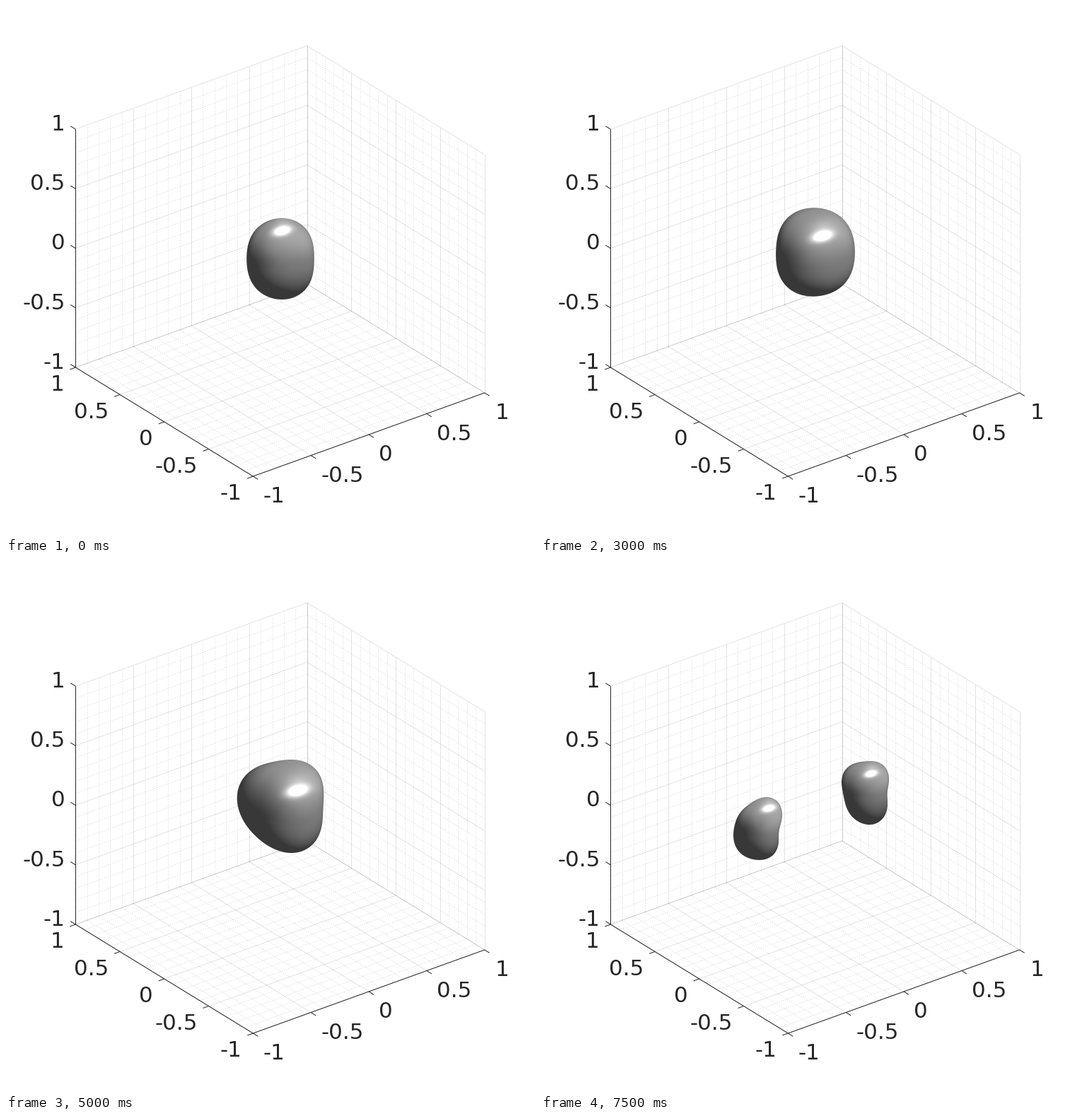
Animation, 748 px wide and 748 px high, one loop 8000 ms. Source, as a matplotlib script:

```python
import numpy as np
import matplotlib.pyplot as plt
from matplotlib.animation import FuncAnimation
from matplotlib.collections import LineCollection

SIZE, DPI, FRAMES, STEP = 748, 100, 16, 500
INK = "#262626"
PX = 72 / DPI  # one pixel in points

fig = plt.figure(figsize=(SIZE / DPI, SIZE / DPI), dpi=DPI, facecolor="white")
ax = fig.add_axes([0, 0, 1, 1])
ax.axis("off")


# ---- axes box -------------------------------------------------------------

def project(x, y, z):
    return np.array([387.5 + 163.7 * x - 125.5 * y,
                     360.6 - 59 * x - 77 * y - 168.4 * z])


def seg(a, b):
    return [project(*a), project(*b)]


def grid(values):
    lines = []
    for v in values:
        lines += [seg((v, -1, -1), (v, 1, -1)), seg((-1, v, -1), (1, v, -1)),
                  seg((v, 1, -1), (v, 1, 1)), seg((-1, 1, v), (1, 1, v)),
                  seg((1, v, -1), (1, v, 1)), seg((1, -1, v), (1, 1, v))]
    return lines


def label(pos, value, dx, dy, ha):
    ax.text(pos[0] + dx, pos[1] + dy, f"{value:g}", ha=ha, va="baseline",
            family="DejaVu Sans", size=31 * PX, color=INK)


def draw_box():
    minor = [v / 10 for v in range(-9, 10) if v % 5]
    major = np.linspace(-1, 1, 5)
    ax.add_collection(LineCollection(grid(minor), colors="#c8c8c8",
                                     linewidths=0.8 * PX,
                                     linestyles=[(0, (1, 2.6))], zorder=1))
    ax.add_collection(LineCollection(grid(major), colors=INK, alpha=0.125,
                                     linewidths=PX, zorder=2))
    edges = [seg((-1, -1, -1), (1, -1, -1)), seg((-1, -1, -1), (-1, 1, -1)),
             seg((-1, 1, -1), (-1, 1, 1))]
    for v in major:
        px, py, pz = project(v, -1, -1), project(-1, v, -1), project(-1, 1, v)
        edges += [[px, px + (7, 4.3)], [py, py + (-8, 2.9)], [pz, pz - (7, 4.3)]]
        label(px, v, 14.5, 37.2, "left")
        label(py, v, -15.8, 33.2, "right")
        label(pz, v, -14.5, 1.7, "right")
    ax.add_collection(LineCollection(edges, colors=INK, linewidths=PX, zorder=3))


# ---- blobs ----------------------------------------------------------------

LIGHT = np.array([.43, .50, .75])
HALF = np.array([.23, .27])  # where a sphere would catch the light
# World axes seen from the camera: right, up, towards the viewer.
WORLD = np.array([[.793, .304, -.527], [-.609, .397, -.687], [0, .866, .5]])

# time step: top, bottom, three-fold waves (cos, sin), lean, glint x, glint y
KEYS = {
    0: (300, 415, -.01, 0, 0, .05, .69),
    2: (275, 409, .005, 0, .005, .14, .56),
    4: (278, 412, -.01, -.01, -.015, .15, .54),
    7: (289, 410, .02, 0, .015, .19, .27),
    10: (278, 410, -.058, .035, -.03, .39, .33),
    12: (268, 422, 0, .04, 0, .19, .56),
}
SPLIT = 15  # step at which the blob has parted in two

X0, Y0, X1, Y1 = 256, 256, 508, 436
gx, gy = np.meshgrid(np.arange(X0, X1) + .5, np.arange(Y0, Y1) + .5)
TURN = np.linspace(0, 2 * np.pi, 361)


def radius(angle, hw, hh, waves, square):
    """Ellipse with a lean, a three-fold wave and slightly squared corners."""
    c3, s3, lean = waves
    ellipse = 1 / np.hypot(np.cos(angle) / hw, np.sin(angle) / hh)
    return ellipse * (1 + c3 * np.cos(3 * angle) + s3 * np.sin(3 * angle)
                      + lean * np.sin(2 * angle) - square * np.cos(4 * angle))


def facing(u, v, glint):
    """Normals of a rounded block, shifted so the glint faces the light."""
    shift = (HALF - glint) / (1 - min(glint @ glint, .7))
    shift *= min(1, .32 / (np.hypot(*shift) + 1e-9))
    fall = np.clip(1 - u * u - v * v, 0, 1)
    u, v = u + shift[0] * fall, v + shift[1] * fall
    n = np.stack([u, v, np.sqrt(np.clip(1 - u * u - v * v, 0, 1))])
    n = np.tensordot(WORLD, n, 1)
    n = np.sign(n) * np.abs(n) ** 1.4
    n /= np.linalg.norm(n, axis=0) + 1e-9
    return np.tensordot(WORLD.T, n, 1)


def gleam(x, y, long, short, tilt):
    a = (x * np.cos(tilt) + y * np.sin(tilt)) / long
    b = (y * np.cos(tilt) - x * np.sin(tilt)) / short
    return np.exp(-(a * a + b * b) / 2)


def paint(img, cx, cy, hw, hh, waves, glint, square=.02):
    glint = np.array(glint)
    shape = (hw, hh, waves, square)
    # Fit the outline to its box.
    r = radius(TURN, *shape)
    ox, oy = r * np.cos(TURN), r * np.sin(TURN)
    sx, sy = 2 * hw / np.ptp(ox), 2 * hh / np.ptp(oy)
    dx = (gx - cx + hw) / sx + ox.min()
    dy = (cy + hh - gy) / sy + oy.min()
    angle = np.arctan2(dy, dx)
    edge = radius(angle, *shape)
    rho = np.hypot(dx, dy) / edge

    rim = np.minimum(rho, 1)
    normal = facing(rim * np.cos(angle), rim * np.sin(angle), glint)
    tone = 56 + 112 * np.clip(np.tensordot(LIGHT, normal, 1), 0, 1)

    ex, ey = gx - cx - glint[0] * hw, cy - gy - glint[1] * hh
    tone += 190 * gleam(ex, ey, .18 * hw, .09 * hw, .25)
    tone += 25 * gleam(ex, ey - .2 * hh, .2 * hw, .12 * hw, .25)

    cover = np.clip((1 - rho) * edge * (sx + sy) / 2 + .5, 0, 1)
    inside = cover > 0
    img[inside, :3] = np.clip(tone / 255, 0, 1)[inside, None]
    img[..., 3] = np.maximum(img[..., 3], cover)


def render(i):
    img = np.zeros(gx.shape + (4,))
    if i < SPLIT:
        top, bottom, *waves, px, py = (np.interp(i, list(KEYS), column)
                                       for column in zip(*KEYS.values()))
        grown = min(i, 12)
        shrink = 1 - .28 * (i - grown)
        paint(img, 388, (top + bottom) / 2, (47.8 + 1.35 * grown) * shrink,
              (bottom - top) / 2 * shrink, waves, (px, py))
    else:
        paint(img, 306.5, 375.5, 34.5, 44.5, (-.07, .005, .087), (.45, .64), .043)
        paint(img, 458.5, 325, 33.5, 45, (-.04, .05, -.023), (.24, .6), .05)
    return img


draw_box()
blob = ax.imshow(render(0), extent=(X0, X1, Y1, Y0), interpolation="nearest",
                 aspect="auto", zorder=5)
ax.set_xlim(0, SIZE)
ax.set_ylim(SIZE, 0)


def update(i):
    blob.set_data(render(i))
    return [blob]


anim = FuncAnimation(fig, update, frames=FRAMES, interval=STEP,
                     repeat=True, repeat_delay=0)
plt.show()
```
